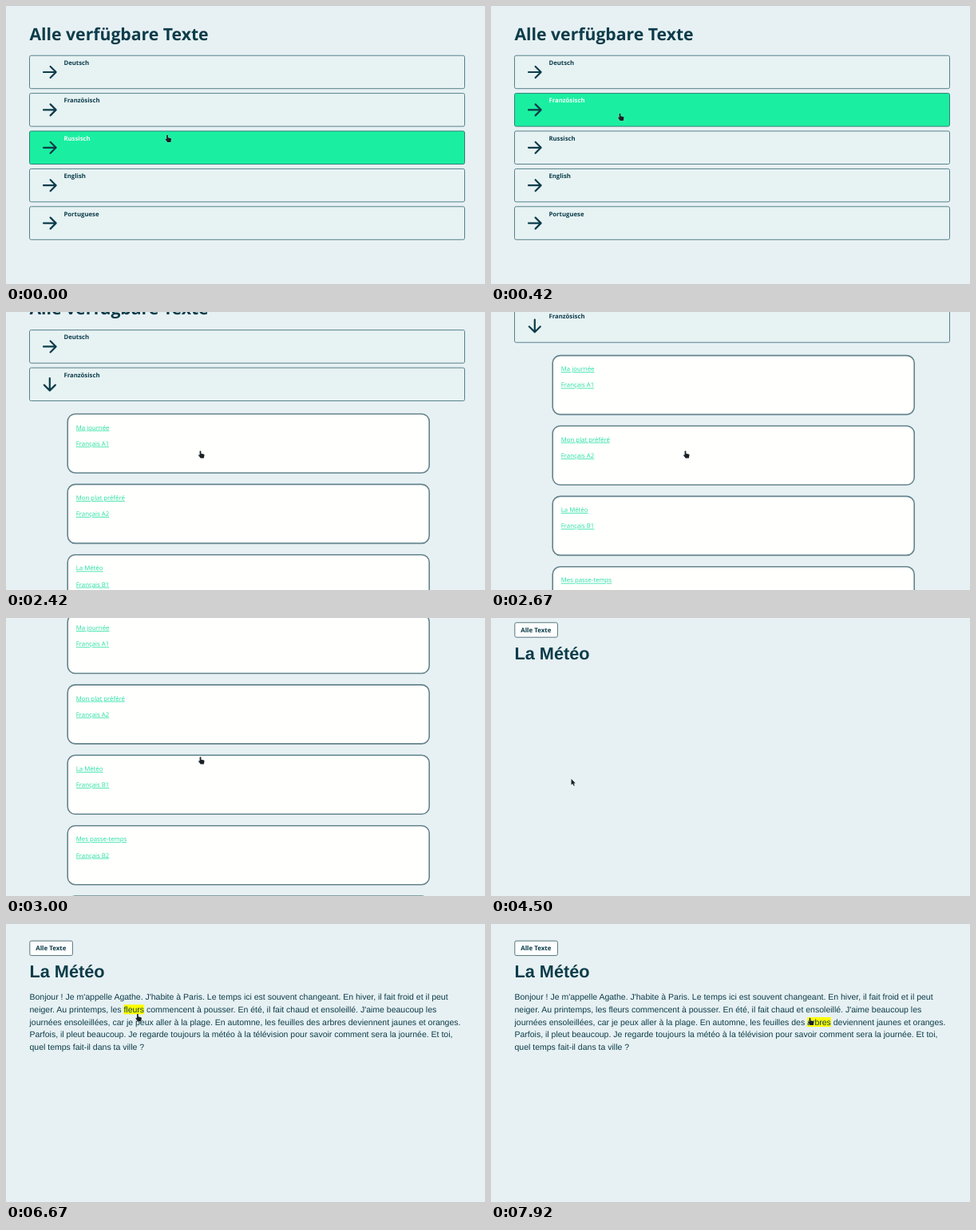
Recreate the animation shown at these times as an HTML page. Size 600 px wide and 349 px high, loop 8000 ms.

```html
<!DOCTYPE html>
<html lang="de">
<head>
<meta charset="utf-8">
<title>Alle Texte</title>
<style>
html, body { margin: 0; width: 100%; height: 100%; overflow: hidden; background: #e7f1f3; }
svg { display: block; width: 600px; height: 349px; }
text { font-family: "Open Sans", "Noto Sans", sans-serif; fill: #0c3c4a; text-rendering: geometricPrecision; white-space: pre; }
.title { font-size: 21.2px; font-weight: 700; }
.label { font-size: 7.75px; font-weight: 700; }
.link { font-size: 7.8px; fill: #1fdfa2; text-decoration: underline; }
.button { font-size: 7.9px; font-weight: 700; }
.heading { font: 700 21.7px "Liberation Sans", Arial, sans-serif; }
.body { font: 10.5px "Liberation Sans", Arial, sans-serif; }
.row { fill: #e7f2f3; stroke: #56808a; }
.hover .row { fill: #1aefa1; stroke: #2f8078; }
.hover .label { fill: #f4fffb; }
.arrow { fill: none; stroke: #0c3c4a; stroke-width: 2.2; stroke-linecap: round; stroke-linejoin: round; }
.card { fill: #fffffd; stroke: #64848d; stroke-width: 1.6; }
.box { fill: #fdfefe; stroke: #56757f; }
.mark { fill: #ffff00; }
.cursor { fill: #1b2126; stroke: #fff; stroke-width: .5; stroke-opacity: .7; paint-order: stroke; }
</style>
</head>
<body>
<svg id="stage" viewBox="0 0 600 349"></svg>
<script>
const LOOP = 8000, FRAME = 1000 / 12;
const OPEN = 1250, PAGE = 4500, LOADED = 4580;
const ROW = { x: 29.5, y: 62.2, w: 545, h: 41.5, step: 47.4 };
const CARD = { x: 77.2, y: 167.5, w: 453, h: 74, step: 88.4 };
const BODY = { x: 29.5, y: 95.1, step: 15.75 };

const languages = ["Deutsch", "Französisch", "Russisch", "English", "Portuguese"];
const cards = [
  ["Ma journée", "Français A1"], ["Mon plat préféré", "Français A2"],
  ["La Météo", "Français B1"], ["Mes passe-temps", "Français B2"], []
];
const story = [
  "Bonjour ! Je m'appelle Agathe. J'habite à Paris. Le temps ici est souvent changeant. En hiver, il fait froid et il peut",
  "neiger. Au printemps, les fleurs commencent à pousser. En été, il fait chaud et ensoleillé. J'aime beaucoup les",
  "journées ensoleillées, car je peux aller à la plage. En automne, les feuilles des arbres deviennent jaunes et oranges.",
  "Parfois, il pleut beaucoup. Je regarde toujours la météo à la télévision pour savoir comment sera la journée. Et toi,",
  "quel temps fait-il dans ta ville ?"
];

// Steps of [time, value...]
const pointer = [
  [0, 202, 162], [420, 161.5, 135], [1840, 161.5, 135], [2170, 243.5, 174.5],
  [3250, 243.5, 174.5], [3920, 100.5, 202], [5670, 100.5, 202],
  [6080, 128, 153], [6500, 108, 104], [6830, 220, 122], [7080, 330, 138],
  [7330, 478, 104], [7580, 440, 92], [7750, 335, 136], [7917, 399.5, 118]
];
const scrolling = [
  [2250, 0], [2333, 13], [2500, 66], [2667, 113], [2833, 147], [3000, 172], [3083, 173]
];
const turning = [[OPEN, 0], [1667, 90]];

const smooth = u => u * u * (3 - 2 * u);
const linear = u => u;

function sample(steps, t, ease) {
  const next = steps.findIndex(s => s[0] > t);
  if (next === 0) return steps[0].slice(1);
  if (next < 0) return steps[steps.length - 1].slice(1);
  const a = steps[next - 1], b = steps[next];
  const u = ease((t - a[0]) / (b[0] - a[0]));
  return a.slice(1).map((v, i) => v + (b[i + 1] - v) * u);
}

function add(parent, tag, attrs = {}, content = "") {
  const el = document.createElementNS("http://www.w3.org/2000/svg", tag);
  for (const name in attrs) el.setAttribute(name, attrs[name]);
  el.textContent = content;
  return parent.appendChild(el);
}
const write = (parent, style, x, y, content) => add(parent, "text", { class: style, x, y }, content);
const frame = (parent, style, x, y, width, height, rx) =>
  add(parent, "rect", { class: style, x, y, width, height, rx });
const show = (el, on) => el.setAttribute("visibility", on ? "visible" : "hidden");
const move = (el, x, y) => el.setAttribute("transform", `translate(${x} ${y})`);
const inside = (r, x, y) => x >= r.x && x <= r.x + r.w && y >= r.y && y <= r.y + r.h;

const stage = document.getElementById("stage");

// List of texts
const list = add(stage, "g");
write(list, "title", 29.5, 43, "Alle verfügbare Texte");
const rows = languages.map((name, i) => {
  const y = ROW.y + i * ROW.step, g = add(list, "g");
  frame(g, "row", ROW.x, y, ROW.w, ROW.h, 2);
  write(g, "label", 72.4, y + 11.8, name);
  const spot = add(g, "g", { transform: `translate(54.8 ${y + 20.8})` });
  const icon = add(spot, "path", { class: "arrow", d: "M-7.8 0H7.8M.8-7L7.8 0L.8 7" });
  return { g, icon, x: ROW.x, y, w: ROW.w, h: ROW.h };
});
const deck = add(list, "g");
const tiles = cards.map((lines, i) => {
  const y = CARD.y + i * CARD.step;
  frame(deck, "card", CARD.x, y, CARD.w, CARD.h, 9.5);
  lines.forEach((line, j) => write(deck, "link", 87.8, y + 19.7 + j * 20.2, line));
  return { x: CARD.x, y, w: CARD.w, h: CARD.h };
});

// Reading page
const page = add(stage, "g");
frame(page, "box", 29.8, 21.2, 53.6, 18.4, 2);
write(page, "button", 37.2, 33.2, "Alle Texte");
write(page, "heading", 29.5, 67, "La Météo");
const article = add(stage, "g");
const mark = add(article, "rect", { class: "mark", height: 12 });
const words = story.flatMap((line, i) => {
  const y = BODY.y + i * BODY.step;
  const el = write(article, "body", BODY.x, y, line);
  return [...line.matchAll(/[\p{L}'-]+/gu)].map(m => ({
    x: el.getStartPositionOfChar(m.index).x,
    y: y - 9.6,
    w: el.getSubStringLength(m.index, m[0].length),
    h: 12
  }));
});

// Pointer shapes, tip at 0,0
const cursor = add(stage, "g", { class: "cursor" });
const tip = add(cursor, "path", { d: "M0 0V7.6L1.8 6L3.1 8.8L4.3 8.2L3.1 5.5H5.4Z" });
const hand = add(cursor, "path", {
  d: "M-.9 .6Q-.9-.3 0-.3Q.9-.3 .9 .6V3.2L4.3 4Q5.2 4.3 5 5.5L4.3 9H.2L-2.4 5.6Q-2.6 4.4-1.4 4.7L-.9 5.2Z"
});

function draw(t) {
  const [x, y] = sample(pointer, t, smooth);
  const [scroll] = sample(scrolling, t, linear);
  const [angle] = sample(turning, t, smooth);
  const open = t >= OPEN, reading = t >= PAGE, loaded = t >= LOADED;

  show(list, !reading);
  deck.setAttribute("visibility", open && !reading ? "inherit" : "hidden");
  move(list, 0, -scroll);
  let target = null;
  rows.forEach((row, i) => {
    const shown = !open || i < 2;
    const hit = !reading && shown && inside(row, x, y + scroll);
    row.g.setAttribute("visibility", shown ? "inherit" : "hidden");
    row.g.setAttribute("class", hit ? "hover" : "");
    if (hit) target = row;
  });
  rows[1].icon.setAttribute("transform", `rotate(${angle})`);
  if (open && !reading) target = target || tiles.find(r => inside(r, x, y + scroll));

  show(page, reading);
  move(page, 0, loaded ? 0 : -15.4);
  show(article, loaded);
  const word = loaded && words.find(r => inside(r, x, y));
  mark.setAttribute("width", word ? word.w : 0);
  if (word) {
    mark.setAttribute("x", word.x);
    mark.setAttribute("y", word.y);
    target = word;
  }

  move(cursor, x, y);
  show(hand, target);
  show(tip, !target);
}

const start = performance.now();
function tick() {
  const t = (performance.now() - start) % LOOP;
  const step = Math.min(95, Math.floor((t + 4) / FRAME));
  draw(step * FRAME);
  requestAnimationFrame(tick);
}
tick();
</script>
</body>
</html>
```
